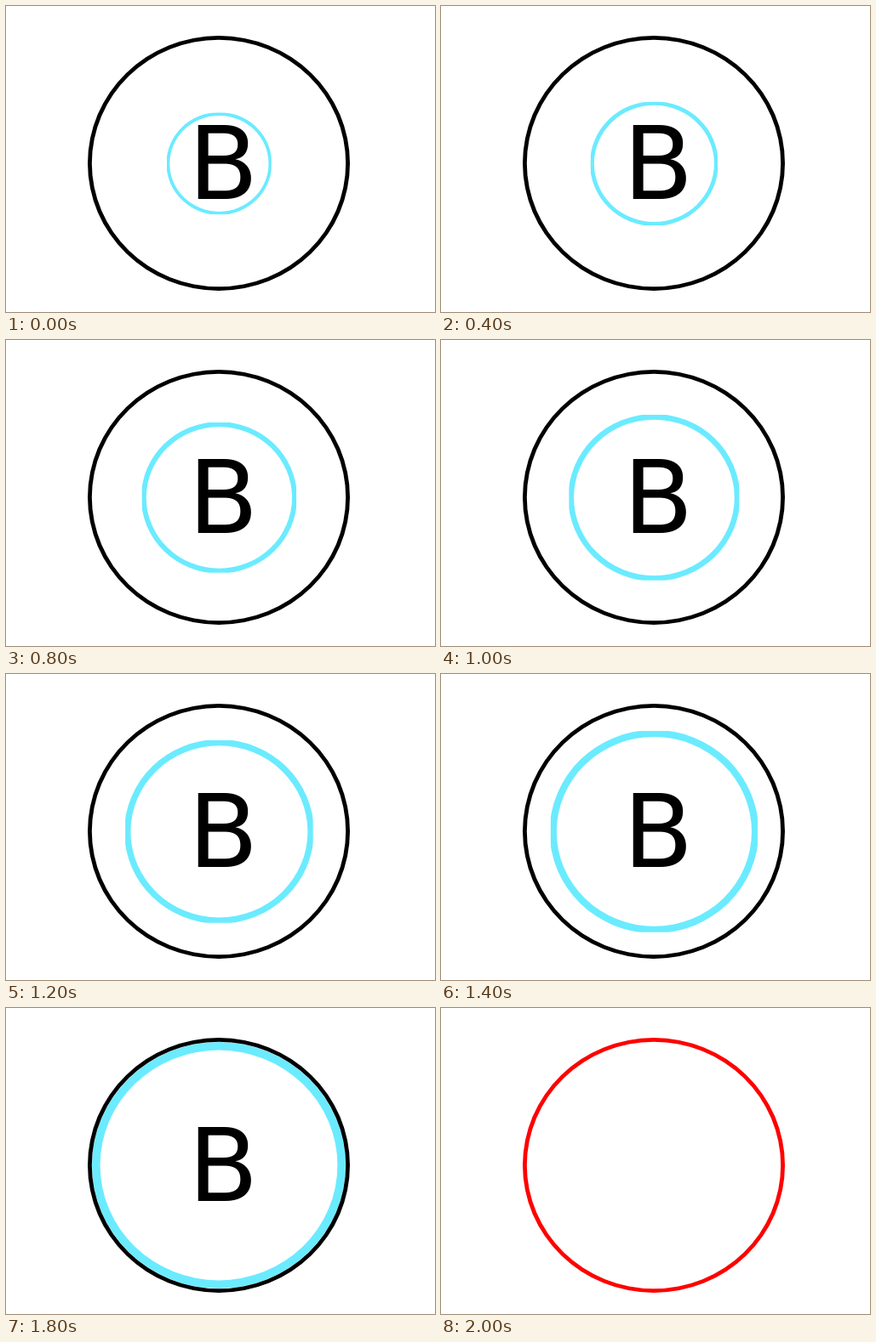
Write an HTML page with a canvas that moves like this. It is 504x360 px and loops after 2.5 s.

```html
<!DOCTYPE html>
<html lang="en">
<head>
<meta charset="utf-8">
<title>Closing ring</title>
<style>
html, body { margin: 0; width: 100%; height: 100%; overflow: hidden; background: #fff; }
canvas { display: block; }
</style>
</head>
<body>
<canvas id="stage" width="504" height="360"></canvas>
<script>
const ctx = document.getElementById("stage").getContext("2d");
const STEP = 100, LOOP = 2500, GROWTH = 1.05, LAST = 20;
const CX = 250, CY = 185;
const CYAN = "#6bebff";

// Annulus between two concentric ellipses
function band(x, y, rx, ry, innerX, innerY, color) {
  ctx.fillStyle = color;
  ctx.beginPath();
  ctx.ellipse(x, y, rx, ry, 0, 0, Math.PI * 2);
  ctx.moveTo(x + innerX, y);
  ctx.ellipse(x, y, innerX, innerY, 0, 0, Math.PI * 2);
  ctx.fill("evenodd");
}

function rim(color) {
  band(CX, CY, 154, 150, 149.2, 145.2, color);
}

// Scaled ring with flattened extremes, as if grown from a small one
function growingRing(step) {
  const scale = GROWTH ** step;
  const rx = 61.4 * scale, ry = 59.8 * scale;
  const width = 3.3 * 1.055 ** step;
  const swell = 0.6 * scale;
  const x = CX + 0.4, y = CY + 0.4;
  ctx.save();
  ctx.beginPath();
  ctx.rect(x - rx, y - ry, rx * 2, ry * 2);
  ctx.clip();
  band(x, y, rx + swell, ry + swell, rx - width, ry - width, CYAN);
  ctx.restore();
}

// Ring pressed against the inside of the rim
function touchingRing(step) {
  const width = step === 18 ? 9.6 : 3.5;
  band(CX, CY, 149, 145, 149 - width, 145 - width, CYAN);
}

function letter() {
  ctx.fillStyle = "#000";
  ctx.font = '120px "DejaVu Sans", sans-serif';
  ctx.textBaseline = "alphabetic";
  ctx.fillText("B", 214, 227);
}

function draw(time) {
  const step = Math.min(LAST, Math.floor((time % LOOP) / STEP));
  ctx.fillStyle = "#fff";
  ctx.fillRect(0, 0, 504, 360);
  if (step === LAST) {
    rim("#f00");
    return;
  }
  if (step < 18) growingRing(step);
  else touchingRing(step);
  rim("#000");
  letter();
}

const start = performance.now();
function tick() {
  draw(performance.now() - start);
  requestAnimationFrame(tick);
}
tick();
</script>
</body>
</html>
```
